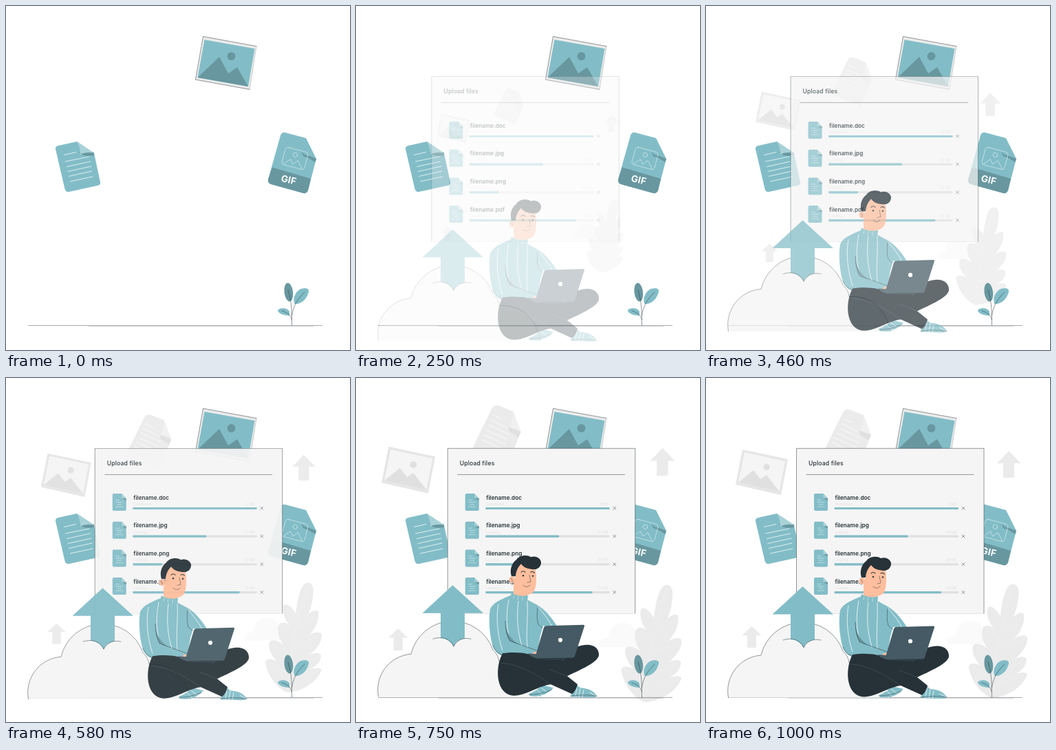
An HTML page for the animation above (1040 ms loop, 500x500 px).

```html
<!DOCTYPE html>
<html lang="en">
<head>
<meta charset="utf-8">
<title>Upload files</title>
<style>
  html, body { margin: 0; width: 100%; height: 100%; overflow: hidden; background: #fff; }
  svg { display: block; width: 100vw; height: 100vh; }
  text { font-family: Inter, "Open Sans", sans-serif; }
  .teal { fill: #82bdc7; }
  .deep { fill: #68979f; }
  .dark { fill: #263238; }
  .slate { fill: #455a64; }
  .skin { fill: #ffbe9d; }
  .pale { fill: #f5f5f5; }
  .grey { fill: #ebebeb; }
  .ink, .white { fill: none; stroke-linecap: round; stroke-linejoin: round; }
  .ink { stroke: #263238; stroke-width: .5; }
  .white { stroke: #fff; stroke-width: .75; }
  .fine { stroke-width: .45; }
  .bold { stroke-width: 1.1; }
  .name { font-size: 8.2px; font-weight: 600; fill: #263238; }
  .note { font-size: 5px; fill: #e0e0e0; }
</style>
</head>
<body>
<svg viewBox="0 0 500 500">
  <g id="backdrop">
    <g id="greyPage">
      <path class="grey" d="M209 46L229 54L240 83L223 125Q221 129 217 127L174 109Q171 107 173 103L199 50Q202 44 209 46Z"/>
      <path fill="#e0e0e0" d="M223 76Q222 82 227 84L236 91L240 83Z"/>
      <path fill="#f0f0f0" d="M229 54L240 83Q231 76 223 77Q229 67 229 54Z"/>
      <path class="white" d="M200 59L213 65M197 66L221 78M194 73L224 87M190 80L221 94M187 87L218 101M184 94L215 108"/>
    </g>
    <g id="greyPhoto">
      <path fill="#e6e6e6" d="M53 104L119 118L109 170L43 155Z"/>
      <path class="pale" d="M56 108L115 121L106.500 165L47 152Z"/>
      <path fill="#e0e0e0" d="M47 152L69 134L79 147L88 141L106.500 165Z"/>
      <circle cx="88" cy="129.500" r="4.700" fill="#e0e0e0"/>
    </g>
    <path class="grey" d="M440 106L457.500 124H448V145H432V124H423Z"/>
    <path class="grey" d="M66.500 361L80.500 374H73V392H60V374H52.500Z"/>
    <path fill="#fafafa" d="M350 387C350 377 357 374 364 374C364 361 373 353 384 353C396 353 404 361 404 371C411 371 414 378 414 387Z"/>
    <path class="grey" d="M415 465C400 459 386 442 382 421C381 414 390 413 399 418C388 406 385 393 389 388C395 384 404 389 409 393C400 381 399 367 404 361C411 358 417 362 420 366C409 354 407 340 410 333C417 330 424 339 428 346C430 328 434 305 443 300C452 297 456 306 454 318C453 330 450 340 447 347C452 342 459 339 462 343C464 357 456 371 447 380C454 374 464 372 467 377C468 390 457 402 448 409C456 404 464 404 466 409C466 421 454 429 444 433C453 428 465 426 467 431C460 450 437 464 415 465Z"/>
    <path fill="none" stroke="#f2f2f2" stroke-width=".5" d="M415 464C418 415 430 350 446 304M431 354L414 337M426 380L409 366M420 407L395 392M417 437L387 419M430 368L457 350M425 395L463 380M420 425L461 413M417 447L462 433"/>
  </g>

  <path fill="none" stroke="#8d9498" stroke-width=".8" d="M32 464.400H460"/>
  <path fill="none" stroke="#9da3a6" stroke-width=".6" d="M120 465.200H447"/>

  <g id="photo">
    <path class="grey" d="M286.500 44.300L364 58.500L354 121.300L275.500 107Z"/>
    <path class="ink" d="M364 58.500L286.500 44.300L275.500 107L354 121.300"/>
    <path class="ink fine" opacity=".5" d="M364 58.500L354 121.300"/>
    <path class="teal" d="M288.500 49L361.500 62L352 117L278.500 104Z"/>
    <path class="deep" d="M278.500 104L310 74L323 98L336 89L352 117Z"/>
    <circle class="deep" cx="327.500" cy="73" r="6"/>
  </g>

  <g id="page">
    <path class="teal" d="M76 203L103 197L128 214L137 256Q138 260 133 261L92 270Q87 271 85.500 266L72 208Q71.500 204 76 203Z"/>
    <path class="deep" d="M106 212L128 212.500L128 217Q112 220 106 212Z"/>
    <path fill="#a8d1d8" d="M103 197L128 213.500Q114 212 108 216Q108 205 103 197Z"/>
    <path class="white" d="M84.500 216.500L101.500 212.500M86.500 226L121 219M88.500 233.500L122.500 226M90 240.500L124 233M91.500 247.500L125 240M93.500 255L126 248"/>
  </g>

  <g id="gifPage">
    <path class="teal" d="M406 184L436 192L451 222L439 268Q437 273 432 272L385 259Q380 257 381 252L399 188Q401 183 406 184Z"/>
    <path class="deep" d="M387 234.500L443 251L439 268Q437 273 432 272L385 259Q380 257 381 252Z"/>
    <path class="deep" d="M430 212Q433 217 439 217.500L451 222L449.500 227L438 220Q430 219 430 212Z"/>
    <g transform="translate(420 221.500) rotate(15)">
      <rect class="white fine" x="-17" y="-13" width="34" height="26" rx="4"/>
      <path class="white fine" d="M-14 12L-6 3L-1 9L5 2L14 12"/>
      <circle class="white fine" cx="-1" cy="-5" r="3.200"/>
    </g>
    <text transform="translate(410 257.300) rotate(13)" text-anchor="middle" font-size="13.500" font-weight="700" letter-spacing=".3" fill="#fff">GIF</text>
  </g>

  <g id="sprout">
    <ellipse class="deep" cx="410.800" cy="416" rx="6.300" ry="13.500" transform="rotate(-7 410.800 416)"/>
    <path class="teal" d="M419.500 433C416 425 421 414 429 411C436 409 441 411 440 415C438 425 430 434 419.500 433Z"/>
    <path class="teal" d="M412 450C402 450 395 446 395 442C398 438 409 438 412 444Z"/>
    <path class="ink" d="M415.500 464C415 445 416 432 410 413M415.500 450C417 437 424 425 434 416M415.500 456C414 449 408 445 401 443"/>
  </g>

  <g id="panel">
    <rect class="pale" x="131.500" y="102.300" width="272.500" height="240.200"/>
    <path fill="none" stroke="#e2e2e2" stroke-width=".8" d="M131.500 342.500H404"/>
    <path class="ink" d="M131.500 342V102.300H404V342"/>
    <path class="ink" d="M146 140.400H389"/>
    <text x="149" y="127" font-size="8.600" font-weight="500" letter-spacing=".15" fill="#263238">Upload files</text>
    <g id="rows"></g>
  </g>

  <g id="cloud">
    <path class="pale" d="M32.500 464.500A52 52 0 0 1 80 403A62 62 0 0 1 199 397Q207 404 208 414C240 412 262 432 268 464.500Z"/>
    <path class="ink" d="M32.500 464.500A52 52 0 0 1 80 403A62 62 0 0 1 199 397Q207 404 208 414C240 412 262 432 268 464.500"/>
    <path class="teal" d="M140.500 303L185 343.500H158V380Q145 383 142 392Q136 381 123 379.500V343.500H96.500Z"/>
    <path class="ink" d="M112 381C126 376 138 382 142 392C146 383 156 378 167 381"/>
  </g>

  <g id="man">
    <path class="teal" d="M251 461Q262 457 271 448L287 452Q278 463 262 464.500L253 464Z"/>
    <path class="teal" d="M318 446L326 452Q344 453 350 464Q349 466 340 466L312 465L315 455Z"/>
    <path class="white" d="M263 455L270 462M269 452L277 458M321 451L319 464M326 453L324 465M331 455L329 465M340 459L349 464"/>
    <path class="ink" d="M252 462Q268 462 284 455M312 464Q331 461 350 464"/>

    <path class="teal" d="M226 317C216 322 199 327 195 338C192 355 195 380 199 392C203 402 212 408 225 407L262 410L268 376L272 362L293 364C286 352 276 339 264 332L249 324V316Z"/>
    <path class="white" d="M207 331C203 350 206 378 213 398M222 324C217 350 219 370 225 385M236 326C233 350 235 370 241 391M249 326C250 350 247 370 249 393M264 334Q278 349 285 363"/>
    <path class="deep" d="M217 358Q218 376 236 389L223 384Q217 374 217 358Z"/>
    <path class="ink" d="M217 355Q217 373 224 384L263 398M264 335Q262 350 265 360L271 365M199 391Q203 403 218 406"/>
    <path class="skin" d="M229 300H247V319Q237 321 229 316Z"/>
    <path class="teal" d="M226 314Q236 320 250 318L249 326Q235 327 224 321Z"/>
    <path class="white fine" d="M230 318L229 322M236 319L235 324M242 320V325"/>

    <path class="dark" d="M226 290C223 281 226 271 233 266C237 259 249 258 254 262C262 259 270 265 269 271C268 279 260 281 255 280L233 290Z"/>
    <ellipse class="skin" cx="227" cy="295" rx="4.500" ry="5"/>
    <path class="skin" d="M232 289C233 281 236 276 240 272C244 278 252 280 261 280C263 293 262 305 259 311C255 318 243 319 236 315Q231 310 230 299Z"/>
    <path class="ink bold" d="M240 284Q243 281 246 284M254 284Q257 282 259.500 285"/>
    <path class="ink" d="M252 288L254 298L249 299M243 303Q248 308 253 303M225 293Q228 294 227 298"/>
    <circle class="dark" cx="243" cy="289" r="1.200"/>
    <circle class="dark" cx="257" cy="289.500" r="1.200"/>

    <path class="dark" d="M213 402C235 399 253 402 263 408L308 405L322 392C342 385 354 393 353 405C351 414 335 422 307 435L322 447Q320 456 314 461L283 447C268 449 255 458 240 462C232 464 225 464 220 461C203 452 203 420 213 402Z"/>
    <path fill="none" stroke="#455a64" stroke-width=".6" d="M211 416Q240 417 283 447M307 435L281 425M322 392Q315 402 299 413M262 409Q282 411 303 410"/>
    <path class="skin" d="M259 400Q268 397 273 405L260 408L253 404Z"/>
    <path class="slate" d="M276 362L330.500 360.500Q332.500 360.500 332 362.500L318 406Q317 408.500 314.500 408.500L261 409Q260 409 260.500 407L273 364.500Q274 362 276 362Z"/>
    <path class="slate" d="M250 402L263 403L262 409L254 406Z"/>
    <circle cx="297" cy="382.500" r="3.100" fill="#fff"/>
  </g>
</svg>
<script>
const $ = id => document.getElementById(id);
const FPS = 24, LOOP = 1040, SLIDE = 30;

const rows = [
  ["doc", "Completed", "2 MB", 180.5],
  ["jpg", "Loading...", "20 MB", 107],
  ["png", "Loading...", "30 MB", 43],
  ["pdf", "Loading...", "15 MB", 155.5]
];

$("rows").innerHTML = rows.map(([ext, state, size, done], i) => `
  <g transform="translate(0 ${i * 40.7})">
    <path class="teal" d="M159 168H170.500L177 175V191Q177 193 175 193H159Q157 193 157 191V170Q157 168 159 168Z"/>
    <path class="deep" d="M170.500 173L177 175V178L171 175Z"/>
    <path fill="#a8d1d8" d="M170.500 168L177 175Q173 174 170.500 175Z"/>
    <path class="white fine" d="M162 177.500H167M162 180.500H172M164 183.500H170M162 187H172"/>
    <text class="name" x="187.500" y="176.500">filename.${ext}</text>
    <text class="note" x="187.500" y="185">${state}</text>
    <text class="note" x="364" y="185" text-anchor="end">${size}</text>
    <rect x="186.500" y="187.900" width="180.500" height="3.200" rx="1.400" fill="#e0e0e0"/>
    <rect class="teal" x="186.500" y="187.900" width="${done}" height="3.200" rx="1.400"/>
    <path class="ink" d="M372 187.300L376 191.300M376 187.300L372 191.300"/>
  </g>`).join("");

const bezier = (a, b, t) => 3 * (1 - t) ** 2 * t * a + 3 * (1 - t) * t * t * b + t ** 3;

// Ease with a late overshoot: cubic-bezier(.36, -.01, .5, 1.38)
function ease(x) {
  if (x >= 1) return 1;
  let low = 0, high = 1;
  for (let i = 0; i < 24; i++) {
    const mid = (low + high) / 2;
    if (bezier(.36, .5, mid) < x) low = mid; else high = mid;
  }
  return bezier(-.01, 1.38, low);
}

function place(id, transform, opacity) {
  $(id).setAttribute("transform", transform);
  $(id).setAttribute("opacity", opacity);
}

function draw(ms) {
  const step = Math.min(FPS, Math.floor((ms % LOOP + 4) * FPS / 1000));
  const p = step ? ease(step / FPS + .028) : 0;
  const opacity = Math.max(0, Math.min(1, p));
  const rest = SLIDE * (1 - p);
  place("backdrop", `translate(250 250) scale(${.5 + p / 2}) translate(-250 -250)`, opacity);
  place("panel", `translate(${-rest} 0)`, opacity);
  place("cloud", `translate(0 ${rest})`, opacity);
  place("man", `translate(0 ${rest})`, opacity);
}

const start = performance.now();
function tick() {
  draw(performance.now() - start);
  requestAnimationFrame(tick);
}
tick();
</script>
</body>
</html>
```
